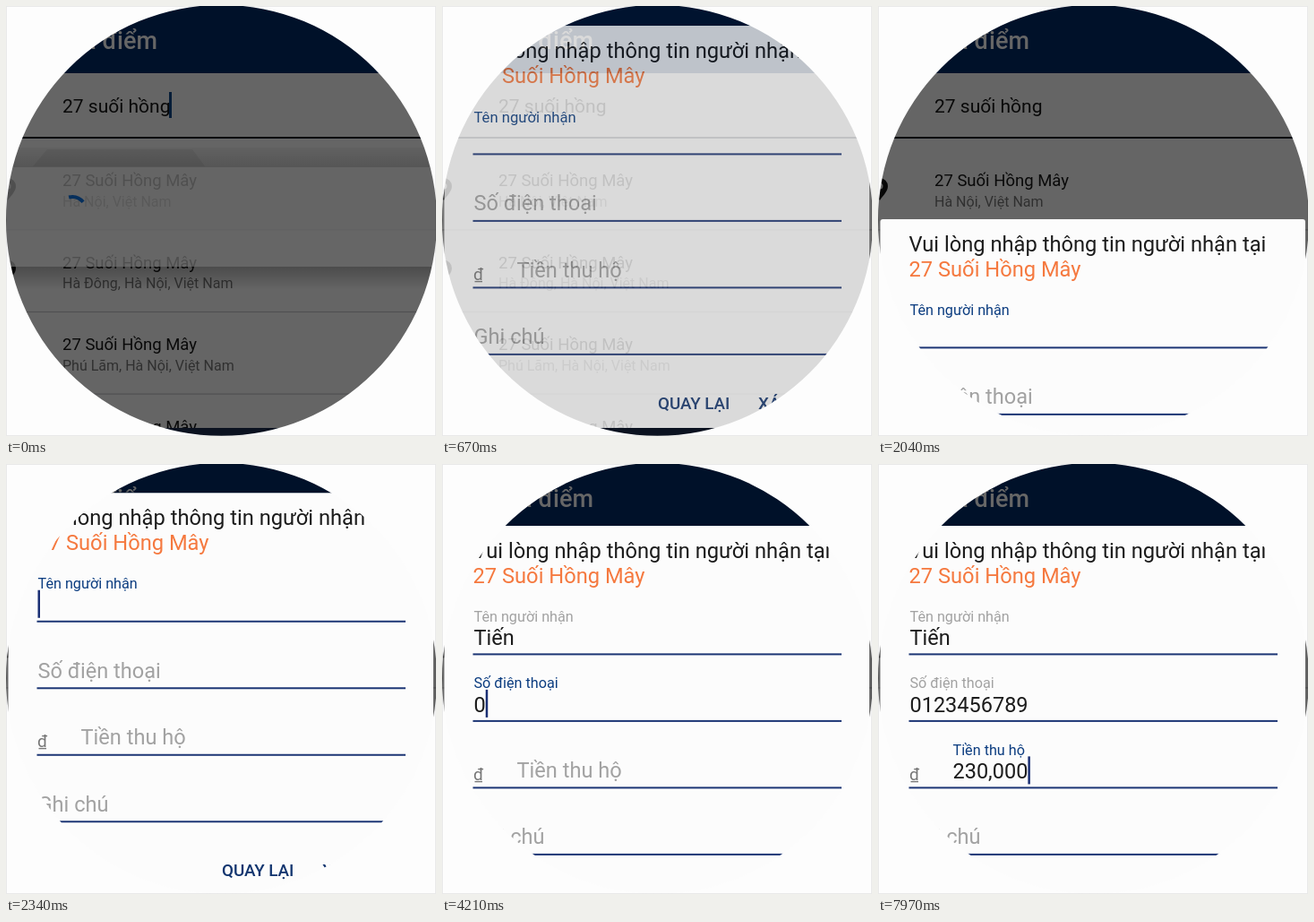
These frames come from a looping animation (480x480 px, 8 s). An HTML page:

```html
<!DOCTYPE html>
<html lang="vi">
<head>
<meta charset="utf-8">
<title>Thông tin người nhận</title>
<style>
  html, body { margin: 0; width: 100%; height: 100%; overflow: hidden; background: #fdfdfd; }
  svg { display: block; width: 100vw; height: 100vh; font-family: Roboto, "Noto Sans", sans-serif; }
  text { white-space: pre; }
</style>
</head>
<body>
<svg id="stage" viewBox="0 0 480 480">
  <defs>
    <linearGradient id="below" x2="0" y2="1">
      <stop offset="0" stop-opacity=".25"/><stop offset="1" stop-opacity="0"/>
    </linearGradient>
    <linearGradient id="above" x2="0" y2="1">
      <stop offset="0" stop-opacity="0"/><stop offset="1" stop-opacity=".12"/>
    </linearGradient>
  </defs>
  <rect width="480" height="480" fill="#fdfdfd"/>
  <rect width="480" height="75" fill="#002b68"/>
  <text x="169" y="48" font-size="27" font-weight="500" fill="#fff" text-anchor="end">Địa điểm</text>
  <text x="63" y="119" font-size="21" fill="#161616">27 suối hồng</text>
  <rect id="searchCaret" x="182" y="96" width="3" height="29" fill="#0e4a8c"/>
  <rect y="146" width="480" height="2" fill="#0d1526"/>
  <rect id="press" y="158" width="480" height="92" opacity=".04"/>
  <g id="rows"></g>
  <rect id="dim" width="480" height="480"/>
  <g id="loader">
    <path d="M30 179L46 160H208L222 179Z" opacity=".06"/>
    <rect y="158" width="480" height="22" fill="url(#above)"/>
    <rect y="291" width="480" height="26" fill="url(#below)"/>
    <rect y="180" width="480" height="111" fill="#676767" opacity=".75"/>
    <path id="spinner" d="M70 213.5A16 16 0 0 1 86 218.7" fill="none" stroke="#062f5c" stroke-width="4"/>
  </g>
  <g id="panel">
    <g id="dialog">
      <rect x="2.5" width="474.5" height="449" rx="3" fill="#fcfcfc"/>
      <text x="34.5" y="36" font-size="23.7" fill="#1c1c1c">Vui lòng nhập thông tin người nhận tại</text>
      <text x="34.5" y="64" font-size="23.7" fill="#f5793f">27 Suối Hồng Mây</text>
      <text x="35" y="284" font-size="19" fill="#777">₫</text>
      <g id="fields"></g>
      <g font-size="18.8" font-weight="500" fill="#12356f">
        <text x="241" y="428">QUAY LẠI</text>
        <text x="353" y="428">XÁC NHẬN</text>
      </g>
    </g>
    <rect y="449" width="480" height="260" fill="#0b1220"/>
  </g>
  <!-- Everything outside the round window -->
  <path fill="#fdfdfd" fill-rule="evenodd"
    d="M-2-2H482V482H-2ZM0 239.3a240.5 240.5 0 0 0 481 0a240.5 240.5 0 0 0-481 0Z"/>
  <rect x=".5" y=".5" width="479" height="479" fill="none" stroke="#000" opacity=".08"/>
</svg>
<script>
const LOOP = 8000;
const BLUE = '#0c3d80', GREY = '#a2a2a2';
const $ = id => document.getElementById(id);

function set(el, attrs) {
  for (const key in attrs) el.setAttribute(key, attrs[key]);
}
function add(parent, tag, attrs, text = '') {
  const el = document.createElementNS('http://www.w3.org/2000/svg', tag);
  set(el, attrs);
  el.textContent = text;
  return parent.appendChild(el);
}
const mix = (a, b, p) => a + (b - a) * p;
const ramp = (t, from, to) => Math.min(1, Math.max(0, (t - from) / (to - from)));
const easeOut = p => 1 - (1 - p) ** 3;
const easeInOut = p => p * p * (3 - 2 * p);

// Result list
['Hà Nội, Việt Nam', 'Hà Đông, Hà Nội, Việt Nam', 'Phú Lãm, Hà Nội, Việt Nam', 'Hà Nội, Việt Nam']
  .forEach((place, i) => {
    const row = add($('rows'), 'g', { transform: `translate(0 ${158 + i * 91.6})` });
    add(row, 'path', {
      d: 'M2 59C-2 53-7 49-7 43A9 9 0 0 1 11 43C11 49 6 53 2 59ZM2 39.5A3.5 3.5 0 0 0 2 46.5A3.5 3.5 0 0 0 2 39.5Z',
      fill: '#111', 'fill-rule': 'evenodd'
    });
    add(row, 'text', { x: 63, y: 43, 'font-size': 18.5, fill: '#161616' }, '27 Suối Hồng Mây');
    add(row, 'text', { x: 63, y: 65.5, 'font-size': 16, fill: '#777' }, place);
    add(row, 'rect', { y: 91.3, width: 480, height: 1.2, fill: '#c8c8cc' });
  });

// Each field: focus span and the times at which its text changes
const evenly = (text, start, step) =>
  [...text].map((_, i) => [start + i * step, text.slice(0, i + 1)]);

const fields = [
  { label: 'Tên người nhận', x: 35.5, focus: 500, blur: 3650, blink: 1050,
    edits: evenly('Tiến', 2560, 130) },
  { label: 'Số điện thoại', x: 35.5, focus: 3650, blur: 6600,
    edits: evenly('0123456789', 4130, 240) },
  { label: 'Tiền thu hộ', x: 83.5, focus: 6600, blur: LOOP,
    edits: [[6900, '2'], [7100, '23'], [7300, '230'], [7480, '2,300'], [7700, '23,000'], [7900, '230,000']] },
  { label: 'Ghi chú', x: 35.5, focus: LOOP, blur: LOOP, edits: [] }
];
fields.forEach((f, i) => {
  const g = $('fields');
  f.base = 143.4 + i * 74.5;
  add(g, 'rect', { x: 34.5, y: f.base - 1, width: 411.5, height: 2, fill: '#1d3675' });
  f.hint = add(g, 'text', { x: f.x }, f.label);
  f.value = add(g, 'text', { x: f.x, y: f.base - 10, 'font-size': 23.5, fill: '#1c1c1c' });
  f.caret = add(g, 'rect', { y: f.base - 35, width: 2.5, height: 31, fill: '#1a2f74' });
});

function drawField(f, t) {
  const active = t >= f.focus && t < f.blur;
  const up = easeInOut(ramp(t, f.focus, f.focus + 200));
  set(f.hint, {
    y: f.base - mix(11.5, 36.5, up),
    'font-size': mix(23.6, 16.2, up),
    fill: active ? BLUE : GREY
  });
  const last = f.edits.filter(e => e[0] <= t).pop();
  const text = last ? last[1] : '';
  if (f.value.textContent !== text) f.value.textContent = text;
  const since = t - (last ? last[0] : f.blink || f.focus);
  const lit = active && since >= 0 && since % 1000 < 500;
  set(f.caret, {
    x: f.x + (text ? f.value.getComputedTextLength() : 0),
    opacity: lit ? 1 : 0
  });
}

// The dialog rests on the keyboard and follows it
function panelTop(t) {
  if (t < 2150) return mix(22, 238, easeOut(ramp(t, 930, 1210)));
  if (t < 3700) return mix(238, 22, easeOut(ramp(t, 2150, 2450)));
  return mix(22, 69, easeOut(ramp(t, 3700, 3950)));
}
function dimLevel(t) {
  return t < 450 ? mix(.6, .2, ramp(t, 60, 410)) : mix(.2, .6, ramp(t, 470, 700));
}

function draw(t) {
  set($('searchCaret'), { opacity: t < 480 ? 1 : 0 });
  set($('press'), { opacity: .04 * (1 - ramp(t, 450, 650)) });
  set($('dim'), { opacity: dimLevel(t) });
  set($('loader'), { opacity: 1 - ramp(t, 20, 170) });
  set($('spinner'), { transform: `rotate(${t * .5} 74 229)` });
  set($('panel'), { transform: `translate(0 ${panelTop(t)})` });
  set($('dialog'), { opacity: ramp(t, 520, 720) });
  fields.forEach(f => drawField(f, t));
}

const start = performance.now();
function tick() {
  draw((performance.now() - start) % LOOP);
  requestAnimationFrame(tick);
}
tick();
</script>
</body>
</html>
```
